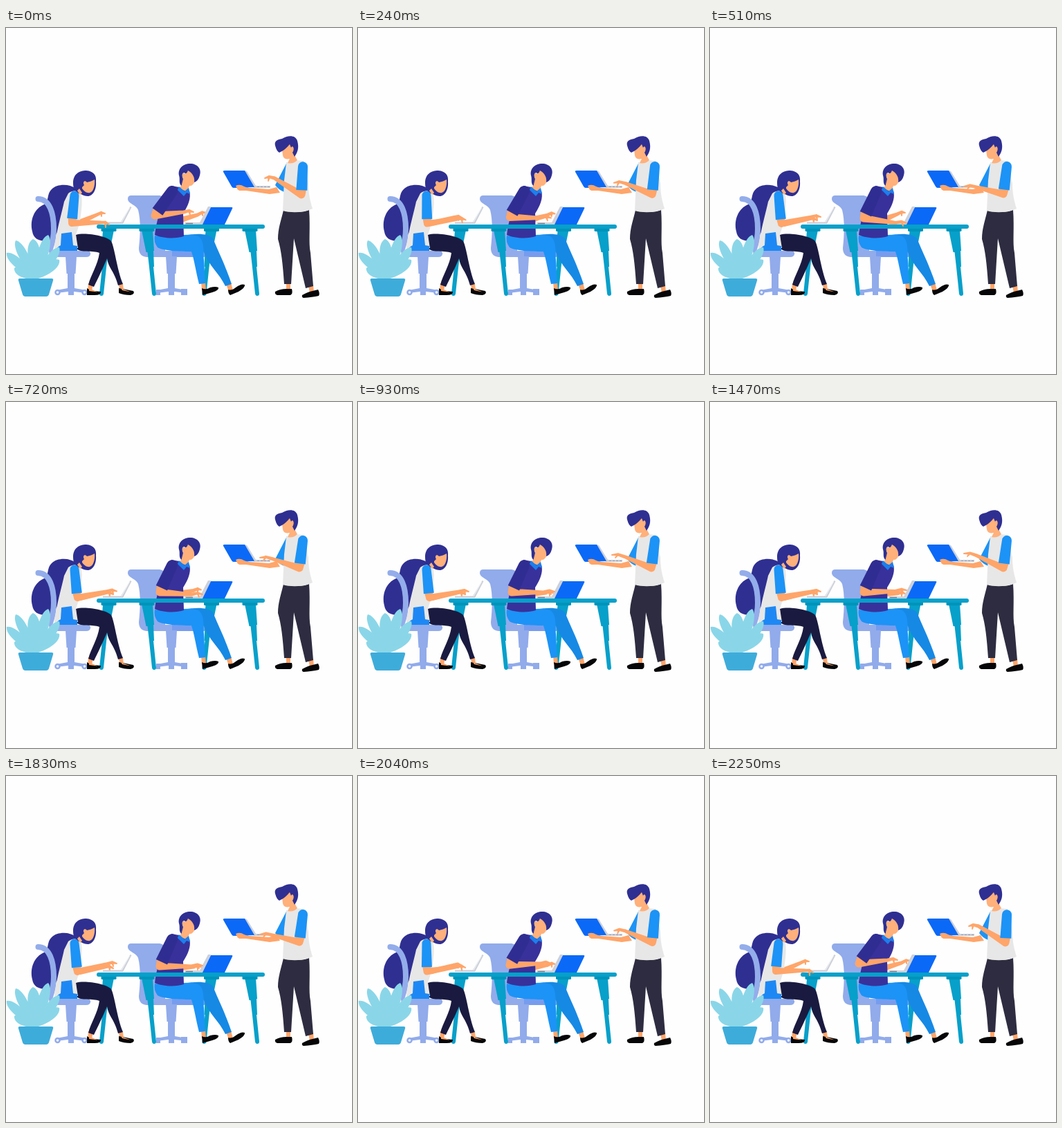
An HTML page that plays this animation: 500 px wide and 500 px high, repeating every 2.49 s.

```html
<!DOCTYPE html>
<html lang="en">
<head>
<meta charset="utf-8">
<title>Team at work</title>
<style>
  html, body { margin: 0; width: 100%; height: 100%; overflow: hidden; background: #fefefe; }
  svg { display: block; width: 100vw; height: 100vh; }
  .skin { fill: #ffa56a; }
  .face { fill: #ffb07b; }
  .hair { fill: #2f2f92; }
  .shirt { fill: #e7e7e7; }
  .blue { fill: #1c93f6; }
  .navy { fill: #38319b; }
  .screen { fill: #0b69f7; }
  .metal { fill: #ccd0da; }
  .teal { fill: #06a0ca; }
  .chair { fill: #91abeb; }
  .shoe { fill: #060608; }
</style>
</head>
<body>
<svg viewBox="0 0 500 500">
  <defs>
    <g id="tableLeg">
      <path class="teal" d="M-7.500 292H8.500L10.500 322H9.500L10.500 345H9.500L13.500 384Q13.500 387 10.500 387Q8 387 7.500 384L3.500 346L1 324L-1 324Z"/>
      <path d="M-11 289H11V293Q11 294 9 294H-9Q-11 294-11 293Z" fill="#0093b9"/>
    </g>
    <g id="chairBase" class="chair">
      <path d="M-8 330H8L6.500 355H5V376L22 379Q24 381 22 383L5 381H-5L-21 383Q-23 381-21 379L-5 376V355H-6.500Z"/>
      <path d="M-4 380H4V386H-4Z"/>
    </g>
  </defs>

  <!-- hair tail and left chair -->
  <path class="hair" d="M101 232C91 225 74 225 66 233C58 241 63 250 55 255C41 261 34 277 38 294C40 306 50 309 62 307C78 302 96 250 101 232Z"/>
  <path d="M46.500 247C63 247 69 268 69 290C69 304 67 311 64 319" fill="none" stroke="#93adeb" stroke-width="8" stroke-linecap="round"/>
  <path class="chair" d="M62 322H118Q123 323 122 327Q121 331 116 331H70Q62 330 62 322Z"/>
  <use href="#chairBase" x="94"/>
  <g fill="#fefefe" stroke="#91abeb" stroke-width="2.500">
    <circle cx="74.500" cy="382" r="3"/><circle cx="113.500" cy="382" r="3"/>
  </g>

  <!-- middle chair -->
  <path class="chair" d="M181 242H222Q230 243 230 252V331H203Q192 330 192 318C194 300 195 278 191 263C188 255 176 254 176 247Q176 242 181 242Z"/>
  <path class="chair" d="M198 322H286Q291 323 290 327Q289 331 284 331H205Q198 330 198 322Z"/>
  <path d="M240 320H286Q291 323 290 327Q289 331 284 331H240Z" fill="#779cee"/>
  <use href="#chairBase" x="239"/>
  <path class="chair" d="M217 378H223V386H217ZM253 377H262V386H253Z"/>

  <use href="#tableLeg" transform="translate(148.500) scale(-1 1)"/>
  <use href="#tableLeg" x="203.500"/>
  <use href="#tableLeg" transform="translate(297) scale(-1 1)"/>
  <use href="#tableLeg" x="352.500"/>

  <!-- seated woman -->
  <path class="skin" d="M119 369H126L124 380H118ZM163 369L169 370L170 379H164Z"/>
  <path class="shoe" d="M117 376Q121 380 137 381Q138 386 128 386H117ZM163 376Q170 377 184 380Q187 384 180 386Q170 386 163 383Z"/>
  <path class="skin" d="M120 376L132 381.500L120 380ZM166 376L180 381.500L168 379Z"/>
  <path d="M101 299C113 295 145 300 152 308C157 317 160 348 169 370L162 372C157 352 148 347 146 333C140 347 133 362 127 374L119 371C122 358 133 342 135 325C125 321 108 325 102 319Z" fill="#1a1a40"/>
  <path class="skin" id="womanFar"/>
  <path class="shirt" d="M90 239C96 234 105 234 108 239C112 250 108 267 107 280L101 299L104 318H70C73 292 82 262 84 251Z"/>
  <path d="M80 297L95 295L97 314L103 315V322H74Q72 317 79 314Z" fill="#1d88f4"/>
  <path class="hair" d="M97 224C97 211 106 206 116 206C127 207 131 213 130 222C131 233 126 243 118 243C112 243 110 240 105 239C99 236 97 231 97 224Z"/>
  <path class="face" d="M110 230L113 227C110 222 114 219 117 223C121 222 125 221 128 219C129 228 126 237 121 238C117 239 113 236 110 232Z"/>
  <path class="face" d="M103 235L106 232L110 238L107 241Z"/>
  <path class="metal" d="M179.500 258L181.500 259L169 283H140V280.500H166Z"/>
  <path d="M178.500 260L167 281" stroke="#f4f5f8" fill="none"/>

  <!-- seated man -->
  <path class="skin" d="M282 367H288L289 379H283ZM318 370L325 368L328 379L322 381Z"/>
  <path class="shoe" d="M283 376Q289 379 295 375Q303 373 307 375Q308 379 298 382L284 386ZM321 378Q326 380 332 375Q340 369 345 371Q346 375 336 381L324 386Q321 384 321 378Z"/>
  <path d="M258 300C275 296 294 297 299 304C305 319 318 345 326 370L317 373C308 354 292 342 286 324Z" fill="#1689e5"/>
  <path class="blue" d="M215 300C240 304 262 295 278 301C287 307 285 320 286 335L288 369L279 370C274 350 272 335 268 323C250 323 227 322 219 317Q213 309 215 300Z"/>
  <path class="skin" id="sitterFar"/>
  <path class="navy" d="M239 228L250 230L265 235C268 246 263 257 256 268L257 301C245 305 226 304 215 299C217 281 223 263 227 249Z"/>
  <path class="face" d="M253 227L256 217C253 212 256 207 259 211L264 205L273 212V221Q270 229 265 228L262 237L251 232Z"/>
  <path d="M250 229L258 236L264 231L266 240L261 238L257 243L248 234Z" fill="#1b7ff0"/>
  <path class="hair" d="M250 213C248 203 256 196 266 196C277 196 283 204 280 213Q278 221 272 223C273 216 270 210 263 206C261 211 259 211 258 209C254 209 254 214 256 218L253.500 228C249 224 252 219 250 213Z"/>
  <path class="metal" d="M292 258H296L285 284H258V281H280Z"/>
  <path d="M260 282.500H270" stroke="#777b8b" stroke-width="1.500"/>
  <path class="screen" d="M296 259H326Q328 259 327 261L316 284H284Z"/>

  <rect class="teal" x="131" y="284" width="243" height="6" rx="3"/>

  <!-- standing man -->
  <path class="skin" d="M405 367H411V379H405ZM437 372L444 371L445 382L439 383Z"/>
  <path class="shoe" d="M389 381Q396 377 405 377H413Q415 384 411 386H392Q388 385 389 381ZM428 386Q437 381 443 380L451 378Q454 384 452 387Q443 389 430 390Q427 389 428 386Z"/>
  <path d="M401 263C415 267 429 267 438 263C440 290 437 310 440 325L444 373L433 376L416 304L412 370H402C400 341 398 322 393 305C393 289 398 277 401 263Z" fill="#2d2c40"/>
  <path class="skin" d="M391 230L396 238L381 240L347 235L337 235L332 229L345 228L351 231L380 233Z"/>
  <path class="blue" d="M406 194L389 227Q394 234 402 237L408 214Z"/>
  <path class="shirt" d="M405 195L417 191L430 192L437 225C437 240 440 252 443 261C428 268 410 267 400 264L402 220Z"/>
  <path class="face" d="M399 176L411 166L419 174L416 182L421 191Q415 197 407 195L410 189Q401 191 400 184Z"/>
  <path class="hair" d="M389 170C387 163 393 161 399 160C407 155 418 154 421 163C424 174 421 180 417 186L414 180C418 174 414 168 412 173L410 168C406 173 400 178 395 180Q391 178 389 170Z"/>
  <path class="metal" d="M344 206L348 207L361 228H382V231H358Z"/>
  <path d="M363 229.500H381" stroke="#9da3b4" stroke-dasharray="3 2"/>
  <path class="screen" d="M316 206H345L359 230L329 231Q327 231 326 229L314 208Q313 206 316 206Z"/>
  <path class="skin" d="M332 228Q338 225 344 229L352 232L345 235L335 234Z"/>

  <!-- near arms -->
  <path class="skin" id="womanNear"/><path class="blue" id="womanSleeve"/>
  <path class="skin" id="sitterNear"/><path fill="#302d92" id="sitterSleeve"/>
  <path class="skin" id="standerNear"/><path class="blue" id="standerSleeve"/>

  <!-- plant -->
  <path id="leaves" fill="#8ad6e8"/>
  <path d="M20 362H66Q69 362 68 365L62 385Q61 388 58 388H28Q25 388 24 385L18 365Q17 362 20 362Z" fill="#3eacda"/>
</svg>
<script>
const LOOP = 2490, MOVE = 2250, STEP = 30;
const keys = [0, 510, 930, 1200, 1470, 1830, MOVE];
const byId = id => document.getElementById(id);
const mix = (a, b, k) => a + (b - a) * k;
const between = (a, b, k) => [mix(a[0], b[0], k), mix(a[1], b[1], k)];
const clamp = x => Math.max(0, Math.min(1, x));
const ease = x => (1 - Math.cos(Math.PI * clamp(x))) / 2;

// rest and typing: elbow, wrist, fingertip; lift: hand height at the inner keys
const arms = [
  { id: 'womanFar', from: [101, 258], r: [5, 4],
    rest: [106, 281, 131, 270, 143, 268], type: [107, 283, 143, 276, 155, 278], lift: [0, 0, 0, 0, 0] },
  { id: 'womanNear', sleeve: 'womanSleeve', from: [99, 242], r: [7.5, 5],
    rest: [95, 282, 137, 281, 149, 284], type: [103, 283, 146, 274, 160, 274], lift: [1, 0, 0, 0, 3] },
  { id: 'sitterFar', from: [250, 258], r: [5, 4.5],
    rest: [250, 278, 277, 270, 289, 267], type: [250, 277, 271, 276, 282, 276], lift: [9, 0, 0, -1, 0] },
  { id: 'sitterNear', sleeve: 'sitterSleeve', from: [240, 236], r: [9, 5.5],
    rest: [215, 271, 257, 266, 271, 266], type: [222, 275, 268, 275, 284, 274], lift: [-8, 0, 1, 2, 0] },
  { id: 'standerNear', sleeve: 'standerSleeve', from: [429, 200], r: [8, 5.5],
    rest: [427, 241, 388, 217, 374, 217], type: [424, 240, 386, 227, 367, 225], lift: [-4, 4, 2, 6, -4] }
];

function taper(a, b, ra, rb, flat) {
  const dx = b[0] - a[0], dy = b[1] - a[1], len = Math.hypot(dx, dy) || 1;
  const at = (p, r) => `${(p[0] - dy / len * r).toFixed(2)} ${(p[1] + dx / len * r).toFixed(2)}`;
  const end = flat ? 'L' : `A${rb} ${rb} 0 0 0 `;
  return `M${at(a, ra)}L${at(b, rb)}${end}${at(b, -rb)}L${at(a, -ra)}A${ra} ${ra} 0 0 0 ${at(a, ra)}Z`;
}

function liftAt(list, t) {
  const all = [0, ...list, 0];
  let i = 0;
  while (i < keys.length - 2 && t >= keys[i + 1]) i++;
  return mix(all[i], all[i + 1], ease((t - keys[i]) / (keys[i + 1] - keys[i])));
}

function drawArm(arm, t) {
  const k = ease(t / 420) * ease((MOVE - t) / 390);
  const p = arm.rest.map((v, i) => mix(v, arm.type[i], k));
  const up = liftAt(arm.lift, t);
  const elbow = [p[0], p[1]];
  const wrist = [p[2], p[3] - up * 0.8];
  const tip = [p[4], p[5] - up];
  const [wide, thin] = arm.r;
  const dir = Math.sign(tip[0] - wrist[0]) || 1;
  const cuff = between(arm.from, elbow, 0.84);
  const middle = between(wrist, tip, 0.55);
  const knuckle = [middle[0], middle[1] - 2];
  const thumb = [tip[0] - dir * 5, tip[1] + 4];
  const upper = arm.sleeve ? taper(cuff, elbow, wide - 1.5, thin) : '';
  byId(arm.id).setAttribute('d', upper + taper(elbow, wrist, thin, 2.5) +
    taper(wrist, knuckle, 2.5, 2) + taper(knuckle, tip, 2, 1) + taper(knuckle, thumb, 1.8, 0.9));
  if (arm.sleeve) byId(arm.sleeve).setAttribute('d', taper(arm.from, cuff, wide - 1, wide, true));
}

function leaf([x, y, w]) {
  const bx = 43, by = 363, dx = x - bx, dy = y - by, len = Math.hypot(dx, dy);
  const at = (f, s) => `${bx + dx * f - dy / len * s} ${by + dy * f + dx / len * s}`;
  return `M${bx} ${by}C${at(0.45, w)} ${at(0.9, w)} ${x} ${y}C${at(0.9, -w)} ${at(0.45, -w)} ${bx} ${by}Z`;
}
byId('leaves').setAttribute('d', [
  [39, 305, 12], [61, 299, 10], [14, 307, 9], [1, 325, 9],
  [77, 317, 9], [77, 335, 9], [12, 347, 9]
].map(leaf).join(''));

const start = performance.now();
function frame() {
  const now = Math.max(0, performance.now() - start) % LOOP;
  const t = Math.min(MOVE, Math.floor(now / STEP) * STEP);
  for (const arm of arms) drawArm(arm, t);
  requestAnimationFrame(frame);
}
frame();
</script>
</body>
</html>
```
